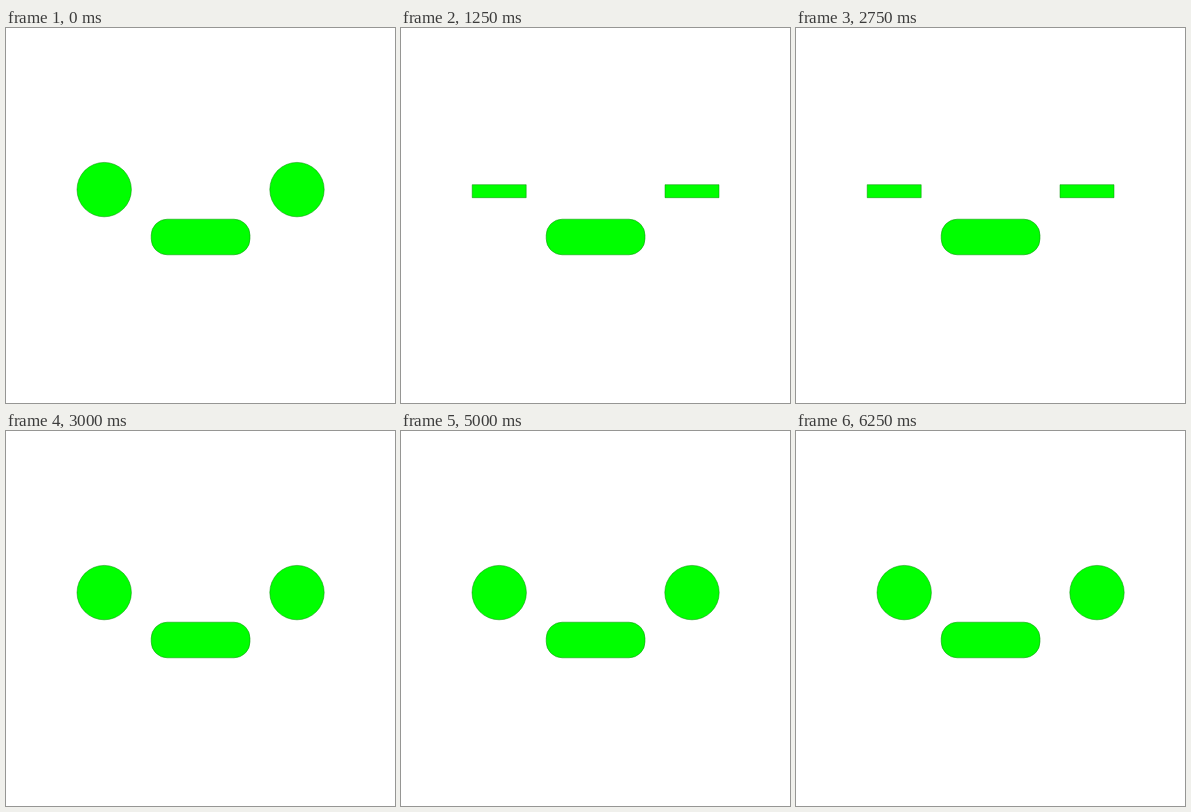
Recreate the animation shown at these times as an HTML page with a canvas. Size 389 by 375 pixels, loop 7250 ms.

```html
<!DOCTYPE html>
<html lang="en">
<head>
<meta charset="utf-8">
<title>Blinking face</title>
<style>
  html, body { margin: 0; width: 100%; height: 100%; overflow: hidden; background: #fff; }
  canvas { display: block; }
</style>
</head>
<body>
<canvas id="stage" width="389" height="375"></canvas>
<script>
  const ctx = document.getElementById('stage').getContext('2d');
  const LOOP = 7250;
  const EYES = [98.2, 291];

  // Each pose holds until its end time.
  const poses = [
    { end: 1250 },
    { end: 1500, shut: true },
    { end: 2750 },
    { end: 3000, shut: true },
    { end: 4000 },
    { end: 5000, look: -10 },
    { end: 6250 },
    { end: LOOP, look: 10 }
  ];

  function paint(trace) {
    ctx.beginPath();
    trace();
    ctx.fill();
    ctx.stroke();
  }

  function draw(time) {
    const { shut = false, look = 0 } = poses.find(p => time < p.end);
    ctx.fillStyle = '#fff';
    ctx.fillRect(0, 0, 389, 375);
    ctx.fillStyle = '#0f0';
    ctx.strokeStyle = '#008c00';
    ctx.lineWidth = 0.5;

    for (const x of EYES) {
      paint(() => shut
        ? ctx.rect(x - 27, 156.7, 54, 13)
        : ctx.arc(x + look, 161.6, 27.2, 0, Math.PI * 2));
    }
    paint(() => ctx.roundRect(145.2, 191.2, 98.8, 35.6, 16));
  }

  const start = performance.now();
  function tick() {
    draw((performance.now() - start) % LOOP);
    requestAnimationFrame(tick);
  }
  tick();
</script>
</body>
</html>
```
